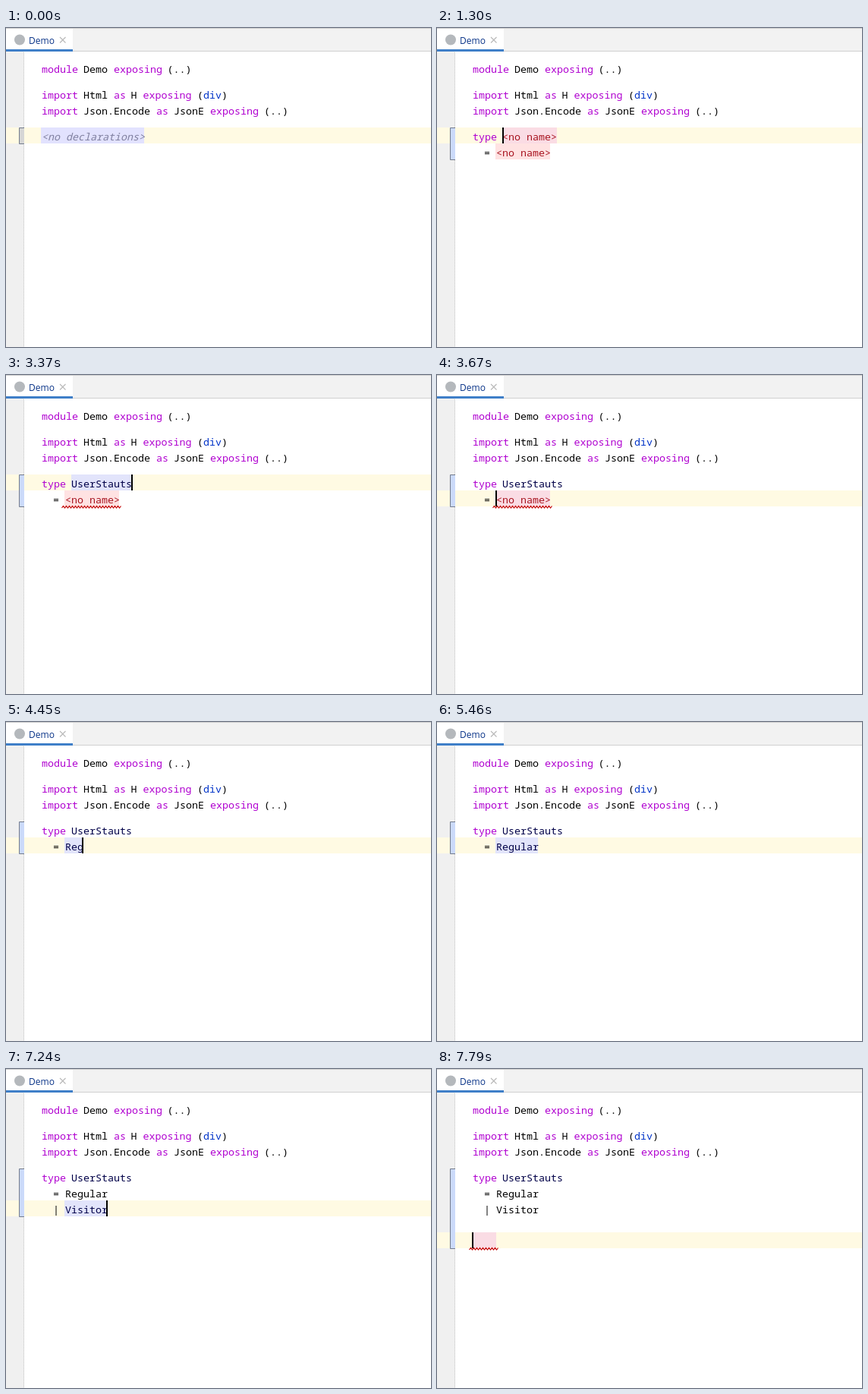
An HTML page that plays this animation: 560 px wide and 420 px high, repeating every 8 s.

```html
<!DOCTYPE html>
<html lang="en">
<head>
<meta charset="utf-8">
<title>Code editor</title>
<style>
  html, body { margin: 0; width: 100%; height: 100%; overflow: hidden; background: #fff; }
  svg { display: block; }
  text { font: 13.333px "Noto Sans Mono", "DejaVu Sans Mono", monospace; fill: #000; }
  .key { fill: #b000d0; }
  .fn { fill: #0033c8; }
  .name { fill: #000048; }
  .bad { fill: #a81420; }
  .hint { fill: #8080a0; font-style: italic; }
  .tab { font: 12px "Open Sans", "Noto Sans", sans-serif; fill: #0a3488; }
</style>
</head>
<body>
<svg width="560" height="420" viewBox="0 0 560 420">
  <rect width="560" height="31" fill="#f2f2f2"/>
  <rect width="560" height="1" fill="#d0d0d0"/>
  <rect y="30" width="560" height="1" fill="#d0d0d0"/>
  <rect y="1" width="88" height="27" fill="#fff"/>
  <rect y="28" width="88" height="3" fill="#3f7fc8"/>
  <circle cx="18" cy="15.5" r="7" fill="#b4b8bc"/>
  <text class="tab" x="30" y="21">Demo</text>
  <path d="M71 12l7.5 7.5m0-7.5l-7.5 7.5" stroke="#b8b8b8" stroke-width="1.1"/>
  <rect y="31" width="24" height="389" fill="#f0f0f0"/>
  <path d="M23.5 32V420" stroke="#c4c4c4" stroke-dasharray="1 1"/>
  <g id="head"></g>
  <g id="body"></g>
</svg>
<script>
const LOOP = 8000, CHAR = 8, ROW = 21;
const TYPE = 131, FIRST = 152, SECOND = 173, NEXT = 215;   // row tops
const NAME_X = 86, CASE_X = 77, LEFT = 46;
const NO_NAME = '<no name>';
const LILAC = '#e2e4fb', PINK = '#ffe2e2', PINK_ACTIVE = '#fadce4';

const rect = (x, y, w, h, fill) =>
  `<rect x="${x}" y="${y}" width="${w}" height="${h}" fill="${fill}"/>`;
const text = (x, row, str, cls = '') =>
  `<text class="${cls}" x="${x}" y="${row + 17}">${str.replace(/</g, '&lt;')}</text>`;
const caret = (x, row, n = 0) => rect(x + n * CHAR - (n ? 1 : 0), row, 2, ROW, '#000');
const band = row => rect(0, row, 17, ROW, '#fffae3') + rect(24, row, 536, ROW, '#fffae3');

function bracket(bottom, fill = '#cbdafa') {
  return rect(17, TYPE, 7, bottom - TYPE + 1, fill) +
    `<path d="M24 131.5H17.5V${bottom + .5}H24" fill="none" stroke="#747c8c"/>`;
}

function squiggle(x, row, n) {
  let d = '', end = x + n * CHAR + 4;
  for (let px = x - 3.5, up = 0; px < end; px += 2, up ^= 1)
    d += `${d ? 'L' : 'M'}${px} ${row + (up ? 20.5 : 23)}`;
  return `<path d="${d}" fill="none" stroke="#c40000" stroke-width="1.2"/>`;
}

// Text sits one pixel in from the cell edge, except in the type name
function cell(x, row, str, bg, cls) {
  return (bg ? rect(x, row, str.length * CHAR, ROW, bg) : '') +
    text(x === NAME_X ? x : x + 1, row, str, cls);
}

// A name being edited, with the caret after its last character
const typed = (x, row, str) => cell(x, row, str, LILAC, 'name') + caret(x, row, str.length);
const missing = (x, row, active, wavy) =>
  cell(x, row, NO_NAME, active ? PINK_ACTIVE : PINK, 'bad') +
  (wavy ? squiggle(x, row, NO_NAME.length) : '') + (active ? caret(x, row) : '');

const typeLine = () => cell(LEFT, TYPE, 'type', '', 'key');
const caseLine = (row, sign) => text(62, row, sign);
const caseName = (row, str) => cell(CASE_X, row, str);

const start = str => band(TYPE) + bracket(TYPE + ROW, '#d6d6d6') +
  (str ? cell(LEFT, TYPE, str, PINK_ACTIVE, 'bad') + caret(LEFT, TYPE, str.length)
       : cell(LEFT, TYPE, '<no declarations>', '#e2e2fe', 'hint'));

const naming = (str, wavy) => band(TYPE) + bracket(FIRST + ROW) + typeLine() +
  (str ? typed(NAME_X, TYPE, str) : missing(NAME_X, TYPE, true, wavy)) +
  caseLine(FIRST, '=') + missing(CASE_X, FIRST, false, wavy);

const named = (row, inner) => band(row) + bracket(row + ROW) + typeLine() +
  cell(NAME_X, TYPE, 'UserStauts', '', 'name') + caseLine(FIRST, '=') + inner;

const firstCase = inner => named(FIRST, inner);

const secondCase = (inner, row = SECOND) =>
  named(row, caseName(FIRST, 'Regular') + caseLine(SECOND, '|') + inner);

const finished = wavy => secondCase(caseName(SECOND, 'Visitor') +
  rect(LEFT, NEXT, 4 * CHAR, ROW, PINK_ACTIVE) +
  (wavy ? squiggle(LEFT, NEXT, 4) : '') + caret(LEFT, NEXT), NEXT);

const steps = [];
const at = (t, svg) => steps.push([t, svg]);
const typing = (word, times, draw) => {
  const skip = word.length - times.length;
  times.forEach((t, i) => {
    const last = i === times.length - 1;
    at(t, draw(word.slice(0, i + 1 + (last ? skip : 0))));
  });
};

at(0, start(''));
typing('type ', [530, 630, 725, 820, 920], start);
at(1300, naming('', false));
at(1530, naming('', true));
typing('UserStauts', [1850, 2000, 2150, 2310, 2460, 2630, 2745, 2860, 3060, 3370],
  s => naming(s, true));
at(3670, firstCase(missing(CASE_X, FIRST, true, true)));
typing('Regular', [3980, 4155, 4330, 4500, 4675, 4850],
  s => firstCase(typed(CASE_X, FIRST, s)));
at(5460, firstCase(cell(CASE_X, FIRST, 'Regular', LILAC, 'name')));
at(5540, secondCase(missing(CASE_X, SECOND, true, false)));
at(5860, secondCase(missing(CASE_X, SECOND, true, true)));
at(6320, secondCase(typed(CASE_X, SECOND, 'V') + squiggle(CASE_X, SECOND, 1)));
typing('Visitor', [6550, 6665, 6780, 6895, 7010, 7125, 7240],
  s => secondCase(typed(CASE_X, SECOND, s)));
at(7620, finished(false));
at(7790, finished(true));

const words = (row, list) => list.map(([x, str, cls]) => text(x, row, str, cls)).join('');
document.getElementById('head').innerHTML =
  words(42, [[47, 'module', 'key'], [102, 'Demo'], [142, 'exposing', 'key'], [212.5, '(..)']]) +
  words(76, [[47, 'import', 'key'], [102, 'Html'], [142, 'as', 'key'], [164.5, 'H'],
    [180.5, 'exposing', 'key'], [252, '('], [260, 'div', 'fn'], [284, ')']]) +
  words(97, [[47, 'import', 'key'], [102, 'Json.Encode'], [198, 'as', 'key'],
    [221, 'JsonE'], [269, 'exposing', 'key'], [340, '(..)']]);

const body = document.getElementById('body');
const began = performance.now();
let shown = -1;
function tick() {
  const t = (performance.now() - began) % LOOP;
  let i = steps.length - 1;
  while (steps[i][0] > t) i--;
  if (i !== shown) body.innerHTML = steps[shown = i][1];
  requestAnimationFrame(tick);
}
tick();
</script>
</body>
</html>
```
